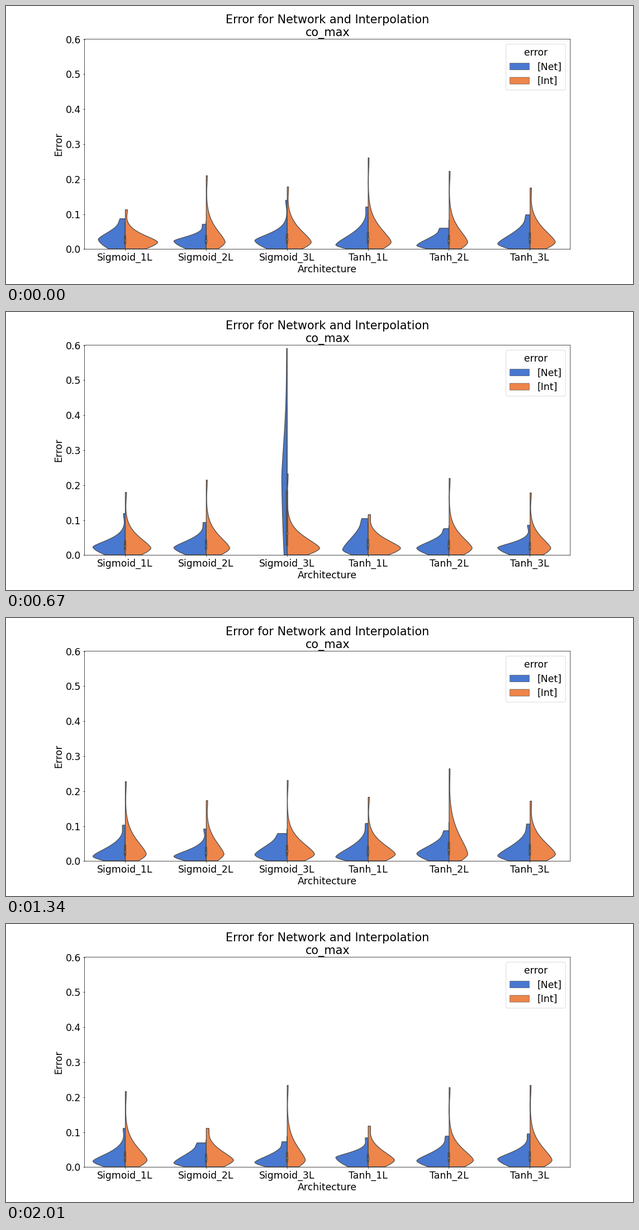
Write a matplotlib script that moves like this. It is 1122 px wide and 499 px high and loops after 2680 ms.

```python
import numpy as np
import matplotlib.pyplot as plt
from matplotlib.animation import ArtistAnimation
from matplotlib.patches import Patch

DPI = 64
SCALE = 1122 / 18 / DPI          # layout designed for an 18 inch wide figure
UNIT_Y = 0.6 / 376.25            # error per pixel of height
UNIT_X = 6 / 869.55              # category step per pixel of width
FULL_WIDTH = 58                  # pixels, widest half violin
INT_PEAK = 13
HEIGHTS = np.arange(1, 380, 0.5)
BLUE, ORANGE, GRAY = "#4878d0", "#ee854a", "#505050"
NAMES = [f"{kind}_{layers}L" for kind in ("Sigmoid", "Tanh") for layers in (1, 2, 3)]

# Per violin, in pixels: net peak, net reach, net top, int reach, int top
SCENES = [
    [(18, 17, 55, 15, 71), (15, 10, 45, 26, 132), (16, 14, 88, 25, 112),
     (8, 21, 76, 28, 164), (7, 17, 38, 26, 140), (10, 21, 62, 26, 110)],
    [(15, 14, 75, 22, 113), (14, 15, 59, 25, 135), (140, 85, 371, 22, 146),
     (10, 30, 66, 18, 73), (13, 15, 48, 24, 138), (14, 10, 54, 22, 112)],
    [(9, 18, 65, 28, 143), (9, 13, 58, 26, 109), (12, 22, 50, 24, 145),
     (8, 20, 68, 21, 115), (14, 18, 55, 38, 166), (10, 21, 67, 26, 108)],
    [(11, 16, 70, 26, 136), (8, 20, 44, 19, 70), (9, 15, 46, 28, 147),
     (18, 10, 53, 19, 74), (12, 16, 56, 23, 143), (15, 14, 60, 27, 147)],
]

plt.rcParams.update({
    "font.family": "DejaVu Sans",
    "font.size": 20 * SCALE,
    "path.snap": False,
    "axes.linewidth": 0.8 * SCALE,
    "axes.labelpad": 4 * SCALE,
    "axes.titlepad": 6 * SCALE,
    "patch.linewidth": SCALE,
    **{f"{axis}tick.major.{key}": value * SCALE
       for axis in "xy" for key, value in (("size", 3.5), ("pad", 3.5), ("width", 0.8))},
})

fig = plt.figure(figsize=(1122 / DPI, 499 / DPI), dpi=DPI, facecolor="white")
ax = fig.add_axes([0.1253, 0.1255, 0.7747, 0.755])


def density(peak, reach, top):
    """Unit-area hump that halves its width at `reach` above the peak."""
    below = np.clip((peak - HEIGHTS) / peak, 0, 1)
    above = np.clip((HEIGHTS - peak) / reach, 0, None)
    shape = (1 - 0.42 * below ** 1.6) * 0.5 ** (above ** 1.5)
    shape = np.where(HEIGHTS <= top, shape, 0)
    return shape / shape.sum()


def tip(top):
    """Small bulge left by the largest samples at the end of a tail."""
    return 240 / top * np.exp(-0.5 * ((top - HEIGHTS) / (top / 8)) ** 2)


def violin(column, net_peak, net_reach, net_top, int_reach, int_top):
    net = density(net_peak, net_reach, net_top)
    interp = density(INT_PEAK, int_reach, int_top)
    widest = max(net.max(), interp.max())
    artists = []
    for curve, top, side, color in ((net, net_top, -1, BLUE), (interp, int_top, 1, ORANGE)):
        width = FULL_WIDTH * curve / widest + tip(top)
        width = np.minimum(width, FULL_WIDTH)
        inside = HEIGHTS <= top
        artists.append(ax.fill_betweenx(HEIGHTS[inside] * UNIT_Y, column,
                                        column + side * width[inside] * UNIT_X,
                                        facecolor=color, edgecolor=GRAY,
                                        linewidth=1.5 * SCALE))

    # The plotted curve is smoothed, so the sample quartiles sit a little lower.
    total = np.cumsum(net + interp) / 2
    low, median, high = 0.9 * np.interp([0.25, 0.5, 0.75], total, HEIGHTS)
    whisker = min(high + 1.5 * (high - low), max(net_top, int_top))
    for start, end, width in ((2, whisker, 1.5), (low, high, 4.5)):
        artists += ax.plot([column, column], [start * UNIT_Y, end * UNIT_Y], color=GRAY,
                           linewidth=width * SCALE, solid_capstyle="butt")
    artists.append(ax.scatter([column], [median * UNIT_Y], s=9 * SCALE ** 2, color="white",
                              edgecolor=GRAY, linewidth=1.5 * SCALE, zorder=3))
    return artists


scenes = [[artist for column, shape in enumerate(scene) for artist in violin(column, *shape)]
          for scene in SCENES]

ax.set_xlim(-0.5, 5.5)
ax.set_ylim(0, 0.6)
ax.set_xticks(range(len(NAMES)), NAMES)
ax.set_yticks(np.arange(7) / 10)
ax.set_xlabel("Architecture")
ax.set_ylabel("Error")
ax.set_title("Error for Network and Interpolation\nco_max", y=1.0)
handles = [Patch(facecolor=color, edgecolor=GRAY, linewidth=0.75 * SCALE, label=label)
           for color, label in ((BLUE, "[Net]"), (ORANGE, "[Int]"))]
ax.legend(handles=handles, title="error", loc="upper right", labelspacing=0.43)

animation = ArtistAnimation(fig, scenes, interval=670, repeat=True, blit=False)
plt.show()
```
